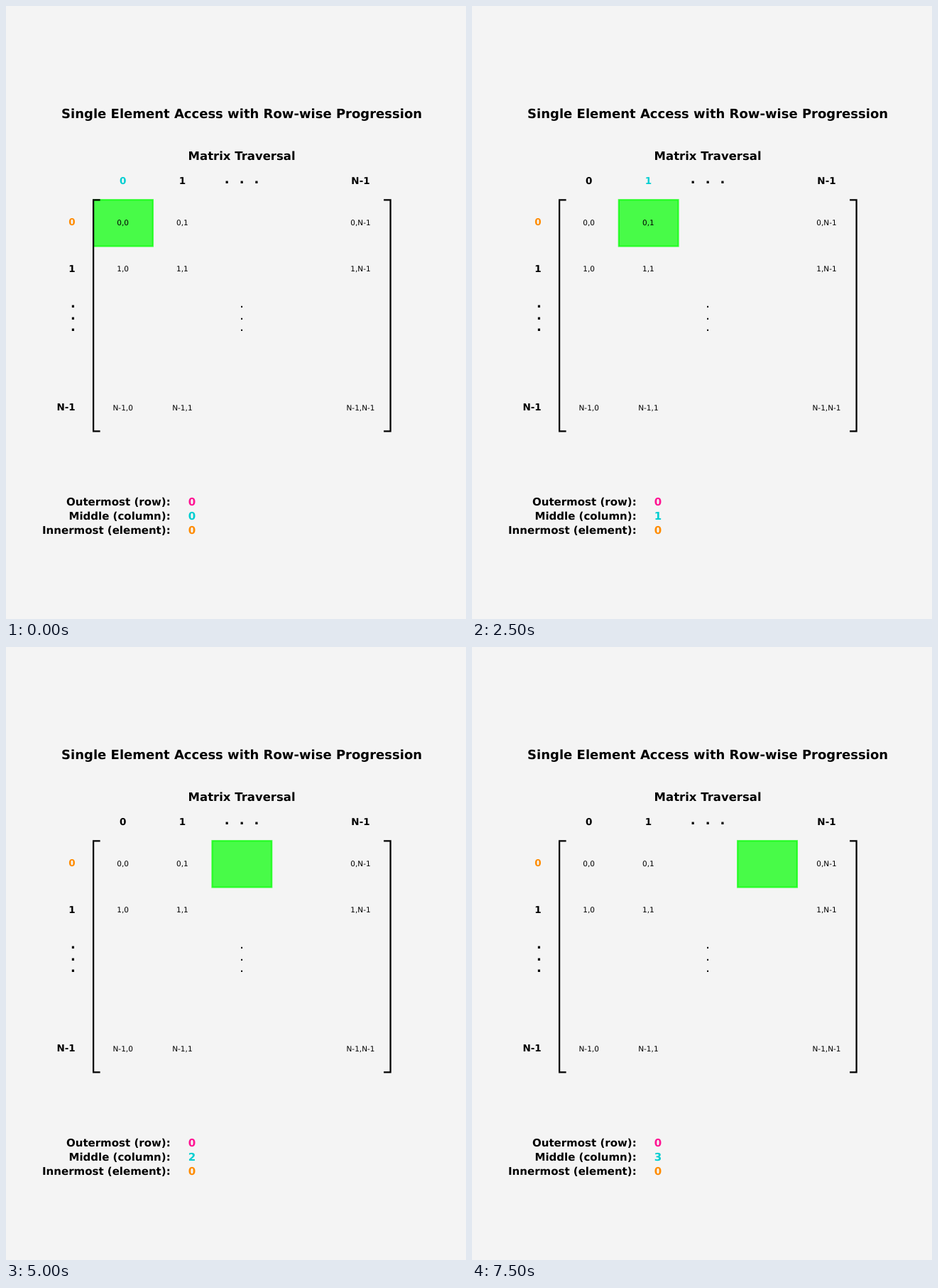
Recreate the animation shown at these times as an HTML page. Size 648 by 864 pixels, loop 8000 ms.

```html
<!DOCTYPE html>
<html lang="en">
<head>
<meta charset="utf-8">
<title>Matrix Traversal</title>
<style>
  html, body { margin: 0; width: 100%; height: 100%; overflow: hidden; background: #f4f4f4; }
  svg { display: block; width: 648px; height: 864px; }
  text { font-family: "DejaVu Sans", sans-serif; text-rendering: geometricPrecision; white-space: pre; }
  .bold { font-weight: bold; }
  .bracket { fill: none; stroke: #000; stroke-width: 2.25; stroke-linecap: square; }
  #cell { fill: #0f0; stroke: #0f0; fill-opacity: .7; stroke-opacity: .7; stroke-width: 2.25; }
</style>
</head>
<body>
<svg id="stage" viewBox="0 0 648 864" xmlns="http://www.w3.org/2000/svg">
  <rect id="cell" y="273.25" width="83.7" height="65.3"/>
  <path class="bracket" d="M131.5 273.25H123.1V599.4H131.5"/>
  <path class="bracket" d="M533.25 273.25H541.6V599.4H533.25"/>
</svg>
<script>
  const STEP = 500, LOOP = 8000, ELEMENTS = 5;
  const CELL_W = 83.7, CELL_H = 65.224;
  const PINK = '#ff1493', CYAN = '#00ced1', ORANGE = '#ff8c00';
  const stage = document.getElementById('stage');
  const cell = document.getElementById('cell');

  // Grid coordinates: (0, 0) is the centre of the first cell.
  const gx = c => 164.7 + c * CELL_W;
  const gy = r => 305.87 + r * CELL_H;

  // Baseline shift, in em, for each vertical alignment.
  const SHIFT = { center: 0.265, bottom: -0.23 };

  function label(str, col, row, size, { anchor = 'middle', align = 'center', bold = true, fill = '#000' } = {}) {
    const el = document.createElementNS(stage.namespaceURI, 'text');
    el.setAttribute('x', gx(col).toFixed(2));
    el.setAttribute('y', (gy(row) + SHIFT[align] * size).toFixed(2));
    el.setAttribute('font-size', size);
    el.setAttribute('text-anchor', anchor);
    el.setAttribute('fill', fill);
    if (bold) el.setAttribute('class', 'bold');
    el.textContent = str;
    stage.append(el);
    return el;
  }

  const above = { align: 'bottom' };
  label('Single Element Access with Row-wise Progression', 2, -2.2, 18, above);
  label('Matrix Traversal', 2, -1.3, 16.5, above);

  const names = [[0, '0'], [1, '1'], [4, 'N-1']];
  const heads = names.map(([i, name]) => label(name, i, -0.8, 13.5, above));
  for (const [i, name] of names) {
    label(name, -0.8, i, 13.5, { anchor: 'end', fill: i === 0 ? ORANGE : '#000' });
    for (const [j, col] of names) label(`${name},${col}`, j, i, 10.5, { bold: false });
  }

  const dotRow = 2.008;
  for (const d of [-0.25, 0, 0.25]) {
    label('.', 2 + d, -0.8, 18, above);
    label('.', -0.8, dotRow + d, 18, { anchor: 'end' });
    label('.', 2, dotRow + d, 18, { bold: false });
  }

  const counters = [
    ['Outermost (row):', PINK],
    ['Middle (column):', CYAN],
    ['Innermost (element):', ORANGE]
  ].map(([name, fill], i) => {
    const row = 6.05 + i * 0.3;
    label(name, 0.8, row, 15, { anchor: 'end' });
    return label('0', 1.1, row, 15, { anchor: 'start', fill });
  });

  let shown = -1;
  function draw(time) {
    const step = Math.floor((time % LOOP) / STEP);
    if (step === shown) return;
    shown = step;
    const col = Math.floor(step / ELEMENTS);
    cell.setAttribute('x', (123.12 + col * CELL_W).toFixed(2));
    heads.forEach((head, i) => head.setAttribute('fill', names[i][0] === col ? CYAN : '#000'));
    counters[1].textContent = col;
    counters[2].textContent = step % ELEMENTS;
  }

  function tick() {
    draw(performance.now());
    requestAnimationFrame(tick);
  }
  tick();
</script>
</body>
</html>
```
